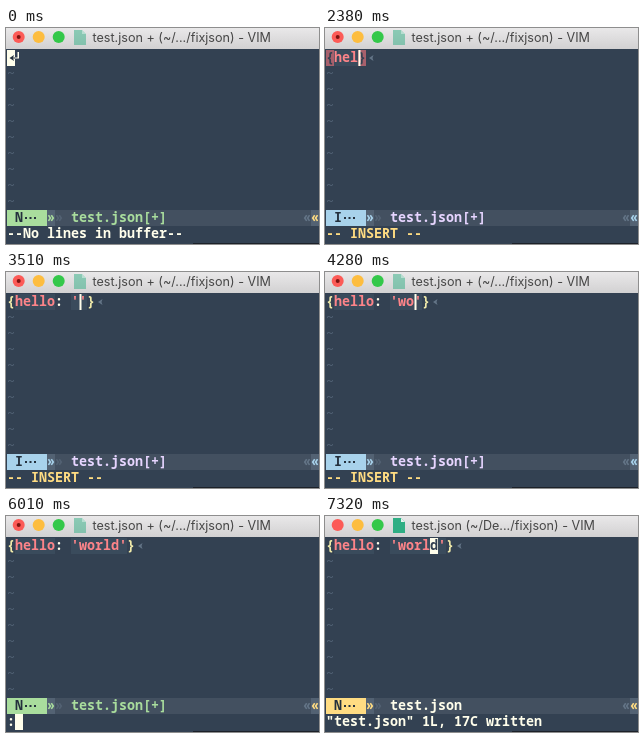
These frames come from a looping animation (313 px wide and 216 px high, 8000 ms). An HTML page with a canvas:

```html
<!DOCTYPE html>
<html lang="en">
<head>
<meta charset="utf-8">
<title>Vim session</title>
<style>
html, body { margin: 0; width: 100%; height: 100%; overflow: hidden; background: #334152; }
canvas { display: block; width: 313px; height: 216px; }
</style>
</head>
<body>
<canvas id="stage"></canvas>
<script>
const W = 313, H = 216, LOOP = 8000;
const CW = 8, RH = 16, LEFT = 1, TOP = 22;
const STATUS = 10, CMD = 11;
const MONO = '"Noto Sans Mono", "DejaVu Sans Mono", monospace';
const C = {
  bg: '#334152', soft: '#3a4b5c', light: '#435060', strong: '#536273',
  fg: '#fffeeb', dim: '#647587', faint: '#56677a', ink: '#24303d',
  red: '#fd8489', match: '#a8606c',
  green: '#a9dd9d', blue: '#a8d2eb', gold: '#ffdc82', pale: '#f0eaaa', lilac: '#e7d5ff'
};
const MODES = {
  normal: { label: 'N', accent: C.green, text: C.green, end: C.gold },
  insert: { label: 'I', accent: C.blue, text: C.lilac, end: C.blue },
  saved: { label: 'N', accent: C.gold, text: C.fg, end: C.gold }
};

// Typed so far: [time, text before cursor, text after cursor]
const TYPING = [
  [0, '', ''], [1190, '{', '}'],
  [2140, '{h', '}'], [2260, '{he', '}'], [2380, '{hel', '}'],
  [2440, '{hell', '}'], [2740, '{hello', '}'], [3030, '{hello:', '}'],
  [3390, '{hello: ', '}'], [3510, "{hello: '", "'}"],
  [4050, "{hello: 'w", "'}"], [4170, "{hello: 'wo", "'}"], [4290, "{hello: 'wor", "'}"],
  [4400, "{hello: 'worl", "'}"], [4520, "{hello: 'world", "'}"]
];
const COMMANDS = [
  [0, '--No lines in buffer--'], [890, '-- INSERT --'], [4940, ''],
  [6010, ':'], [6190, ':w'], [7150, '"test.json" 1L, 17C written']
];

const canvas = document.getElementById('stage');
const ctx = canvas.getContext('2d');
const dpr = window.devicePixelRatio || 1;
canvas.width = W * dpr;
canvas.height = H * dpr;

const within = (t, a, b) => t >= a && t < b;
const latest = (list, t) => list.filter(e => e[0] <= t).pop();
const colX = col => LEFT + col * CW;
const rowY = row => TOP + row * RH;

function rect(x, y, w, h, color) {
  ctx.fillStyle = color;
  ctx.fillRect(x, y, w, h);
}

function cells(col, row, count, color) {
  rect(colX(col), rowY(row), count * CW, RH, color);
}

function put(text, col, row, color, weight = 600) {
  ctx.font = `${weight} 13.33px ${MONO}`;
  ctx.textAlign = 'center';
  ctx.fillStyle = color;
  [...text].forEach((ch, i) => ctx.fillText(ch, colX(col + i) + CW / 2, rowY(row) + 12));
}

function path(color, ...points) {
  ctx.fillStyle = color;
  ctx.beginPath();
  points.forEach(([x, y]) => ctx.lineTo(x, y));
  ctx.fill();
}

function dot(x, y, r, color) {
  ctx.fillStyle = color;
  ctx.beginPath();
  ctx.arc(x, y, r, 0, Math.PI * 2);
  ctx.fill();
}

function arrowHead(x, y, color) {
  path(color, [x, y], [x + 4.5, y - 3], [x + 3.5, y], [x + 4.5, y + 3]);
}

function drawTitle(saved) {
  const shade = ctx.createLinearGradient(0, 0, 0, 21);
  shade.addColorStop(0, '#e9e8e9');
  shade.addColorStop(1, '#d2d1d2');
  rect(0, 0, W, 21, shade);
  ['#fc5b57', '#fdbd3f', '#34c84a'].forEach((color, i) => dot(12.7 + i * 20, 9, 6, color));
  if (!saved) dot(12.7, 9, 2, '#7d1410');

  ctx.globalAlpha = saved ? 1 : 0.5;
  path('#2fae84', [68, 2], [76, 2], [80, 6], [80, 17], [68, 17]);
  path('#e4f4ee', [76, 2], [80, 6], [76, 6]);
  ctx.globalAlpha = 1;

  ctx.font = '12.6px Inter, "Open Sans", sans-serif';
  ctx.textAlign = 'left';
  ctx.fillStyle = '#464646';
  ctx.fillText(saved ? 'test.json (~/De.../fixjson) - VIM' : 'test.json + (~/.../fixjson) - VIM', 86.5, 14);
}

function drawBuffer(t, before, after, insert) {
  const line = before + after;
  const matched = insert && after === '}';
  [...line].forEach((ch, i) => {
    if (ch === '{' || ch === '}') {
      if (matched) cells(i, 0, 1, C.match);
      put(ch, i, 0, matched ? C.bg : C.pale, 'bold');
    } else if (ch === ':' || ch === ' ') {
      put(ch, i, 0, C.fg);
    } else {
      cells(i, 0, 1, C.soft);
      put(ch, i, 0, C.red, 'bold');
    }
  });
  if (line || insert) arrowHead(colX(line.length) + 3, 30, C.dim);
  for (let row = 1; row < STATUS; row++) put('~', 0, row, C.faint, 'normal');

  if (insert) {
    if (!within(t, 1910, 2140)) rect(colX(before.length) + 0.5, TOP, 2, RH, C.fg);
  } else if (!line) {
    drawEmptyLine(!within(t, 170, 410));
  } else if (!within(t, 5840, 7150)) {
    cells(before.length - 1, 0, 1, C.fg);
    put(before.slice(-1), before.length - 1, 0, C.bg, 'bold');
  }
}

// The return mark is wider than its cell and pokes out of the cursor
function drawEmptyLine(cursor) {
  if (cursor) cells(0, 0, 1, C.fg);
  const head = cursor ? C.ink : C.dim;
  const tail = cursor ? C.fg : C.dim;
  arrowHead(3.5, 30, head);
  rect(6, 29.5, 3, 1, head);
  rect(9, 29.5, 4, 1, tail);
  rect(11.5, 24, 1.5, 6, tail);
}

function drawStatus(mode, modified) {
  const { label, accent, text, end } = mode;
  cells(0, STATUS, 39, C.light);
  cells(0, STATUS, 5, accent);
  put(label, 1, STATUS, C.ink, 'bold');
  for (let i = 0; i < 3; i++) rect(19 + i * 4.5, 189, 2, 2, C.ink);
  cells(5, STATUS, 1, C.strong);
  put('»', 5, STATUS, accent);
  put('»', 6, STATUS, C.strong);
  put('test.json' + (modified ? '[+]' : ''), 8, STATUS, text);
  put('«', 37, STATUS, C.dim);
  cells(38, STATUS, 1, C.strong);
  put('«', 38, STATUS, end);
}

function drawCommand(t, text) {
  const insert = text === '-- INSERT --';
  put(text, 0, CMD, insert ? C.gold : C.fg, insert ? 'bold' : 600);
  if (within(t, 6010, 6910)) cells(text.length, CMD, 1, C.fg);
}

function draw(t) {
  const [, before, after] = latest(TYPING, t);
  const insert = within(t, 830, 4940);
  const saved = t >= 7150;
  ctx.setTransform(dpr, 0, 0, dpr, 0, 0);
  rect(0, 0, W, H, C.bg);
  drawTitle(t >= 7270);
  drawBuffer(t, before, after, insert);
  drawStatus(saved ? MODES.saved : insert ? MODES.insert : MODES.normal, !saved);
  drawCommand(t, latest(COMMANDS, t)[1]);
  rect(187, 215, W - 187, 1, '#1c2129');
}

const start = performance.now();
function tick() {
  draw((performance.now() - start) % LOOP);
  requestAnimationFrame(tick);
}
tick();
</script>
</body>
</html>
```
